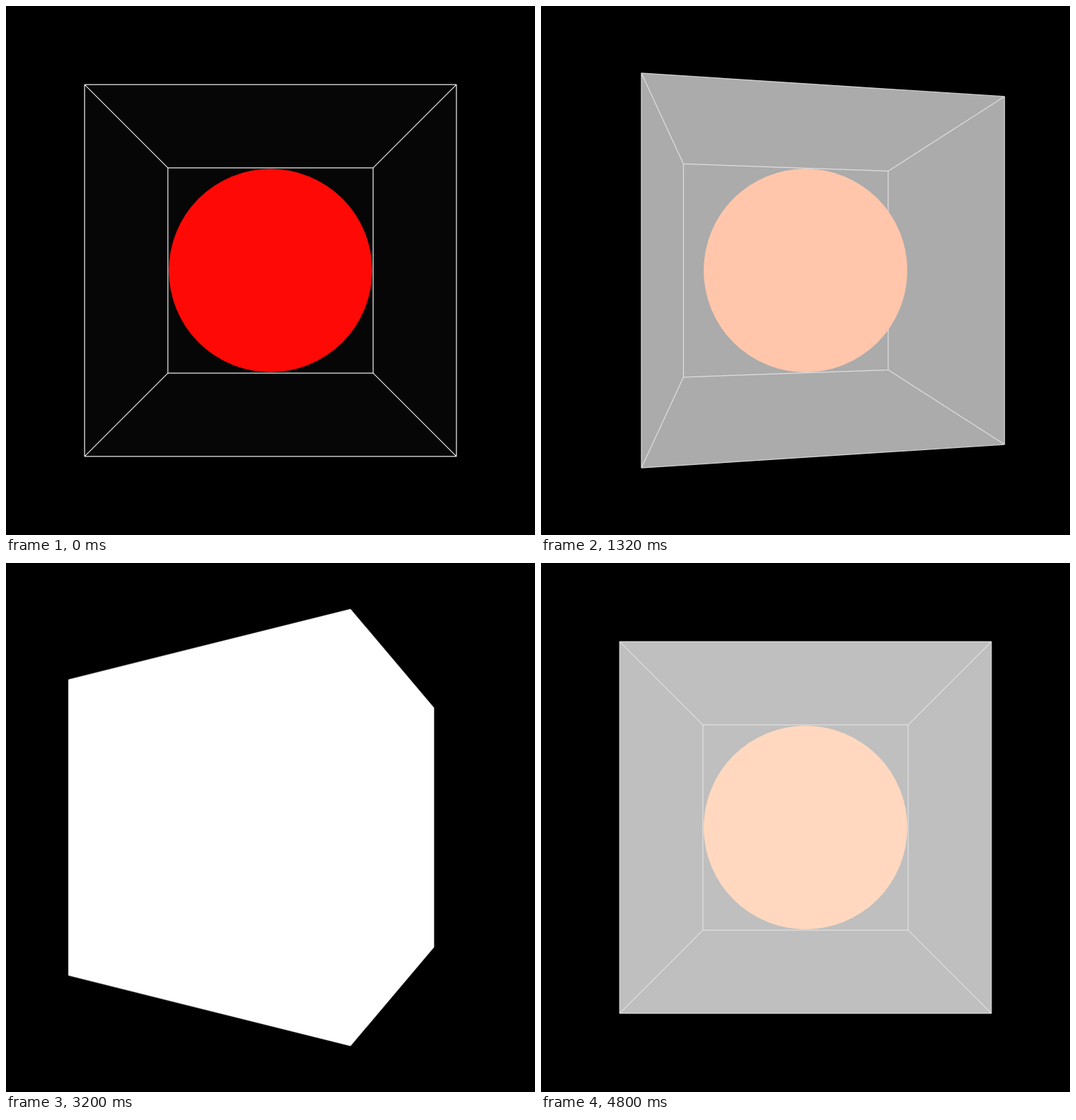
Write an HTML page that moves like this. It is 748 px wide and 748 px high and loops after 4840 ms.

```html
<!DOCTYPE html>
<html lang="en">
<head>
<meta charset="utf-8">
<title>Sphere in a turning cube</title>
<style>
html, body { margin: 0; width: 100%; height: 100%; overflow: hidden; background: #000; }
svg { display: block; width: 100%; height: 100%; }
</style>
</head>
<body>
<svg viewBox="0 0 748 748">
  <rect width="748" height="748" fill="#000"/>
  <path id="veil" fill="#fff"/>
  <circle id="ball" cx="374" cy="374" r="143.8"/>
  <path id="wire" fill="none" stroke-width="1.25" stroke-linejoin="round"/>
  <circle id="glow" cx="374" cy="374" r="143.8"/>
</svg>
<script>
const STEP = 40, COUNT = 121, PEAK = 80;
const MID = 374, FOCAL = MID * Math.sqrt(3), DIST = 2 * Math.sqrt(3);
const [veil, ball, wire, glow] = ['veil', 'ball', 'wire', 'glow'].map(id => document.getElementById(id));

function set(el, attrs) {
  for (const key in attrs) el.setAttribute(key, attrs[key]);
}

function rgb(...parts) {
  return `rgb(${parts.map(v => Math.round(v * 255))})`;
}

// One vertical edge of the cube, projected: screen x, top and bottom y.
function pillar(deg) {
  const a = deg * Math.PI / 180;
  const scale = FOCAL / (DIST - Math.SQRT2 * Math.cos(a));
  return { x: MID + Math.SQRT2 * Math.sin(a) * scale, top: MID - scale, bottom: MID + scale };
}

function draw(n) {
  const p = [0, 1, 2, 3].map(i => pillar(n * 3 - 45 + i * 90));
  let sides = '', lines = '';
  p.forEach((a, i) => {
    const b = p[(i + 1) % 4];
    // Sides that face the viewer cover the whole silhouette.
    if (a.x < b.x) sides += `M${a.x} ${a.top}L${b.x} ${b.top}V${b.bottom}L${a.x} ${a.bottom}Z`;
    lines += `M${a.x} ${a.top}V${a.bottom}M${a.x} ${a.top}L${b.x} ${b.top}M${a.x} ${a.bottom}L${b.x} ${b.bottom}`;
  });

  const wall = n < PEAK ? (n + 1) / PEAK : 2 - n / PEAK;
  const cover = 1 - (1 - wall) ** 2; // two walls deep
  const light = Math.max(0.92, cover);
  const tint = rgb(1, 1 - (1 - wall) ** 2.7, cover); // red warms through orange to white

  set(veil, { d: sides, 'fill-opacity': cover });
  set(ball, { fill: tint });
  set(wire, { d: lines, stroke: rgb(light, light, light), 'stroke-opacity': 1 - wall / 2 });
  // The wire behind the ball sinks out of sight as the walls thicken.
  set(glow, { fill: tint, 'fill-opacity': Math.min(1, wall * 3) });
}

let start;
function tick(now) {
  start ??= now;
  draw(Math.floor((now - start) / STEP) % COUNT);
  requestAnimationFrame(tick);
}
draw(0);
requestAnimationFrame(tick);
</script>
</body>
</html>
```
